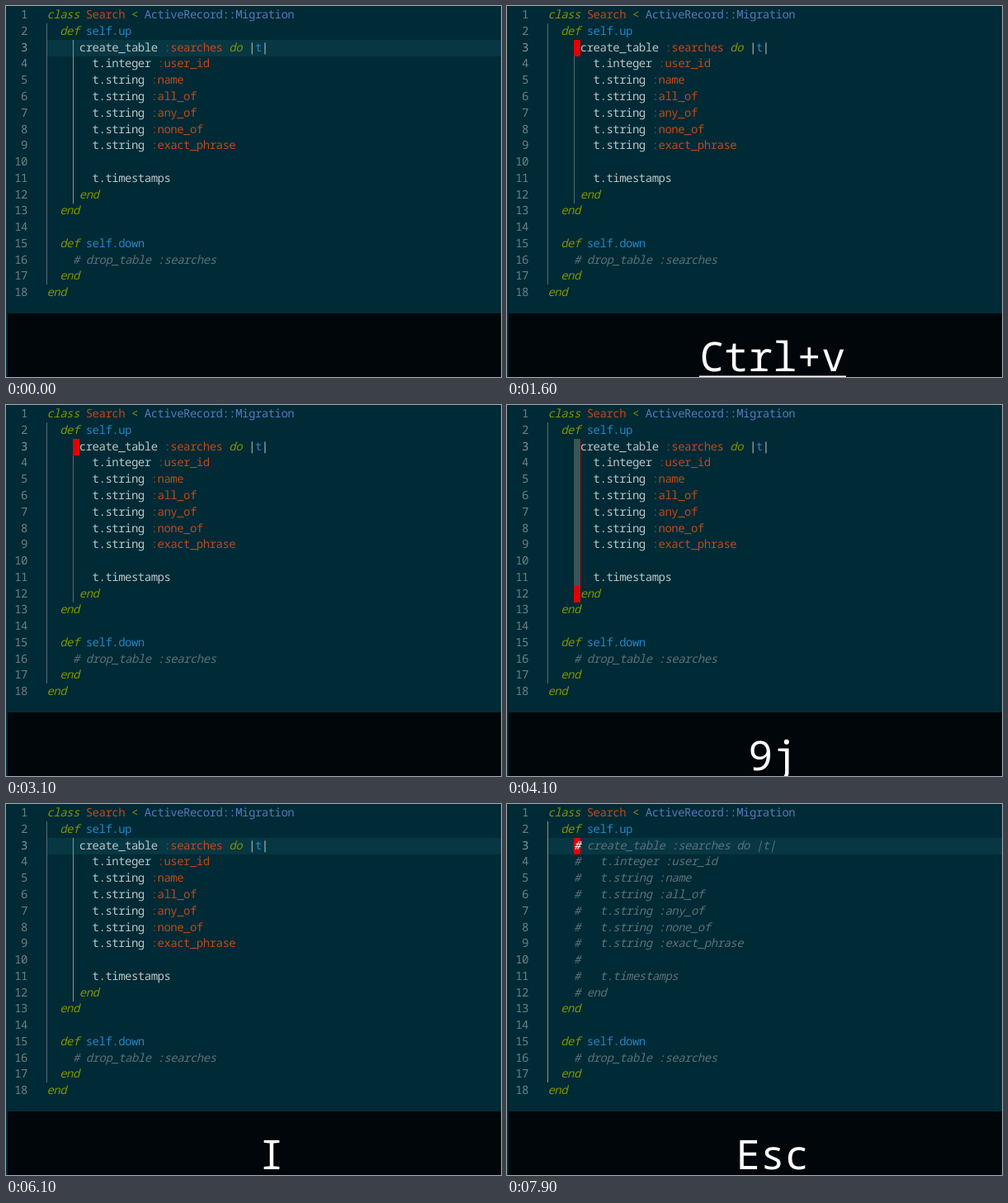
An HTML page that plays this animation: 600x449 px, repeating every 8 s.

```html
<!DOCTYPE html>
<html lang="en">
<head>
<meta charset="utf-8">
<title>Block commenting</title>
<style>
  html, body { margin: 0; width: 100%; height: 100%; overflow: hidden; background: #002a35; }
  #stage { position: relative; width: 600px; height: 449px; overflow: hidden;
    font-family: "Noto Sans Mono", "DejaVu Sans Mono", monospace; text-rendering: geometricPrecision; }
  #stage div { position: absolute; }
  .line, .num { font-size: 14px; letter-spacing: -.51px; line-height: 19.76px; white-space: pre; color: #b9c6c7; }
  .line { left: 49.4px; }
  .num { right: 574px; color: #6a8086; }
  .num.now { color: #82969a; }
  .key { color: #7f9302; font-style: italic; }
  .op { color: #7f9302; }
  .sym, .cls { color: #bd4a1c; }
  .sym b { font-weight: 400; color: #84401f; }
  .base { color: #5678b8; }
  .fn { color: #2585c6; }
  .note { color: #5b7178; font-style: italic; }
  .white { color: #fff; }
  #panel { left: 2px; top: 372px; width: 598px; height: 77px; background: #000609; }
  #keys { left: 122px; width: 400px; top: 372px; height: 77px; overflow: hidden; text-align: center;
    font-size: 49.2px; font-weight: 300; line-height: 104px; color: #fff; white-space: pre; }
  #keys u { display: inline-block; height: 77px; text-decoration: none; }
  #keys .fresh { box-shadow: inset 0 -1.5px #fff; }
</style>
</head>
<body>
<div id="stage"></div>
<script>
const stage = document.getElementById('stage');
const ROW = 19.76, TOP = 1.4, COL = 7.89, LEFT = 49.4;
const rowY = n => TOP + ROW * (n - 1);
const textY = n => rowY(n) - .2;
const colX = n => LEFT + COL * n;
const BRIGHT = '#839799', DIM = '#546d73';

const source = `class Search < ActiveRecord::Migration
  def self.up
     create_table :searches do |t|
       t.integer :user_id
       t.string :name
       t.string :all_of
       t.string :any_of
       t.string :none_of
       t.string :exact_phrase
     
       t.timestamps
     end
  end

  def self.down
    # drop_table :searches
  end
end`.split('\n');

function add(cls, style = {}, html = '') {
  const el = document.createElement('div');
  el.className = cls;
  for (const k in style) el.style[k] = typeof style[k] === 'number' ? style[k] + 'px' : style[k];
  el.innerHTML = html;
  return stage.appendChild(el);
}
const box = (left, top, width, height, background) => add('', { left, top, width, height, background });
const show = (el, on) => { el.style.visibility = on ? 'visible' : 'hidden'; };
const span = (cls, s) => `<span class="${cls}">${s}</span>`;

const rules = [
  [/#.*/, 'note'], [/\b(?:class|def|end|do)\b/, 'key'], [/ActiveRecord::Migration/, 'base'],
  [/:\w+/, 'sym'], [/Search/, 'cls'], [/</, 'op'], [/self\.\w+|\bt(?=\|)/, 'fn']
];
const tokens = new RegExp(rules.map(r => `(${r[0].source})`).join('|'), 'g');
const paint = text => text.replace(tokens, (s, ...groups) => {
  const cls = rules[groups.findIndex(g => g !== undefined)][1];
  return span(cls, cls === 'sym' ? '<b>:</b>' + s.slice(1) : s.replace('<', '&lt;'));
});

const highlight = box(LEFT, rowY(3), 551, ROW, '#073743');
const outer = box(49, rowY(2), 1, ROW * 16, '');
const inner = box(81, rowY(3), 1, ROW * 10, '');
const selection = box(colX(4), rowY(3), COL, ROW * 9, '#3b5455');
const block = box(colX(4), 0, COL, ROW, '#e00000');
const bars = Array.from({ length: 10 }, (_, i) => box(0, rowY(i + 3), 1, ROW, '#c01810'));

const plain = [], noted = [];
source.forEach((text, i) => {
  const n = i + 1, top = textY(n);
  add(n === 3 ? 'num now' : 'num', { top }, n);
  const line = add('line', { top }, paint(text));
  if (n >= 3 && n <= 12) {
    plain.push(line);
    noted.push(add('line', { top }, paint(text.slice(0, 4) + '#' + text.slice(4))));
  }
});
const hash = add('line white', { top: textY(3), left: colX(4), fontStyle: 'italic' }, '#');
add('').id = 'panel';
const keys = add('');
keys.id = 'keys';

// start, end, keys already shown, key just pressed
const presses = [
  [1600, 2700, '', 'Ctrl+v'], [3500, 3800, '', '9'], [3800, 5000, '9', 'j'],
  [5200, 6400, '', 'I'], [6400, 7500, 'I', '#'], [7680, 8000, '', 'Esc']
];
// editor modes; each one restarts the cursor blink
const modes = [
  [0, 'normal'], [1600, 'visual'], [3800, 'block'],
  [5300, 'insert'], [6400, 'typed'], [7680, 'done']
];
let shown = null;

function draw(t) {
  const [start, mode] = modes.filter(m => m[0] <= t).pop();
  const phase = mode === 'normal' ? t + 550 : t - start;
  const lit = phase % 1000 < 550;
  const commented = mode === 'typed' || mode === 'done';
  const inserting = mode === 'insert' || mode === 'typed';
  const blocked = mode === 'block';
  const innerActive = mode === 'normal' || mode === 'insert';

  show(highlight, mode !== 'visual' && !blocked);
  show(selection, blocked);
  show(inner, !commented);
  inner.style.background = innerActive ? BRIGHT : DIM;
  outer.style.background = commented ? BRIGHT : DIM;
  plain.forEach(el => show(el, !commented));
  noted.forEach(el => show(el, commented));
  show(block, lit && !inserting);
  block.style.top = rowY(blocked ? 12 : 3) + 'px';
  show(hash, lit && mode === 'done');
  const barX = colX(mode === 'insert' ? 4 : 5) - .5;
  bars.forEach((el, i) => {
    show(el, lit && (inserting || blocked && i < 9));
    el.style.left = barX + 'px';
  });

  const press = presses.find(p => t >= p[0] && t < p[1]);
  const html = press ? press[2] + `<u class="${t - press[0] < 190 ? 'fresh' : ''}">${press[3]}</u>` : '';
  if (html !== shown) keys.innerHTML = shown = html;
}

const begin = performance.now();
function tick() {
  draw((performance.now() - begin) % 8000);
  requestAnimationFrame(tick);
}
tick();
</script>
</body>
</html>
```
